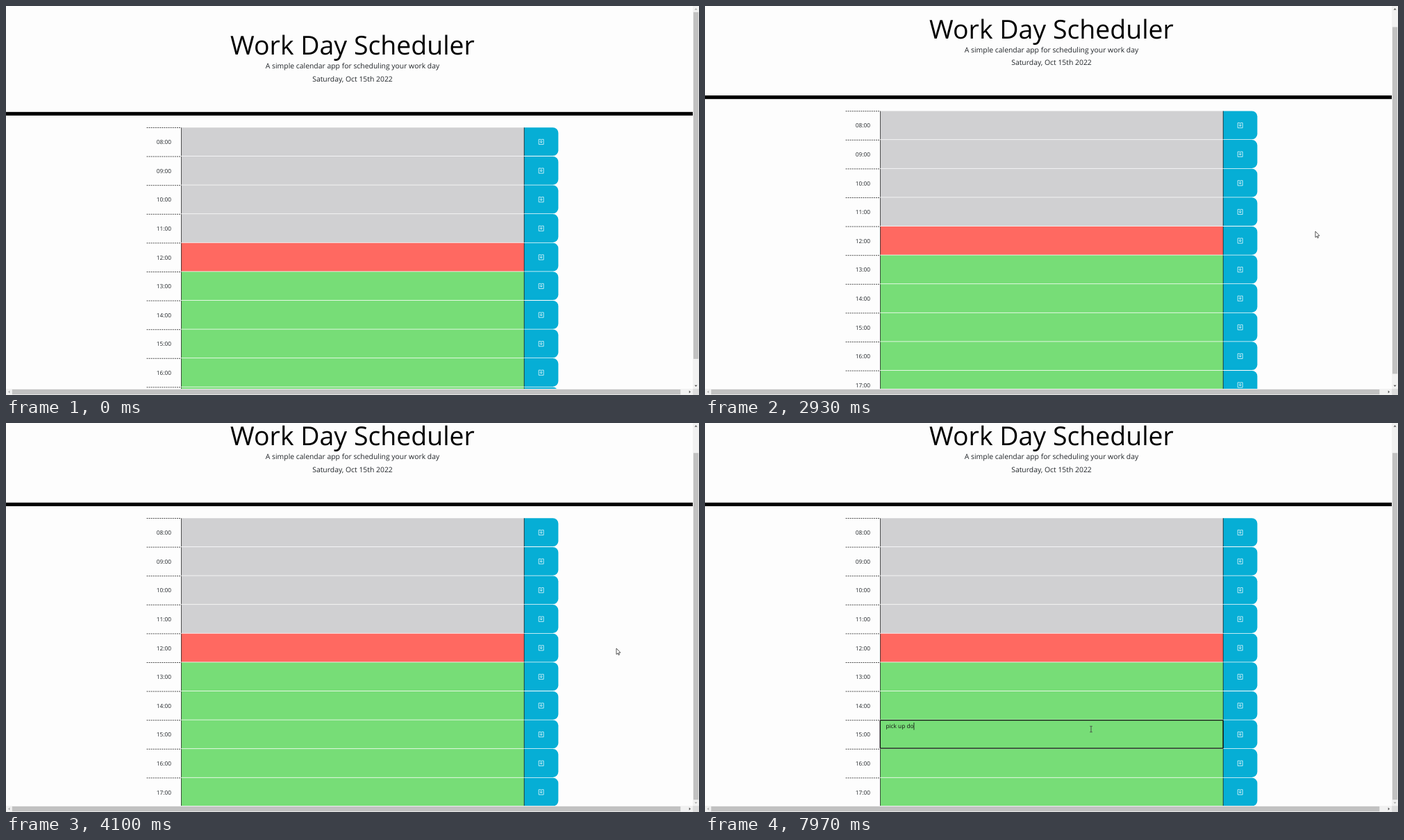
Animation, 998 px wide and 561 px high, one loop 8000 ms. Source, as an HTML page with a canvas:

```html
<!DOCTYPE html>
<html lang="en">
<head>
<meta charset="utf-8">
<title>Work Day Scheduler</title>
<style>
html, body { margin: 0; width: 100%; height: 100%; overflow: hidden; background: #fdfdfd; }
canvas { display: block; width: 998px; height: 561px; }
</style>
</head>
<body>
<canvas id="stage"></canvas>
<script>
const W = 998, H = 561, LOOP = 8000;
const canvas = document.getElementById('stage');
const ctx = canvas.getContext('2d');
const dpr = window.devicePixelRatio || 1;
canvas.width = W * dpr;
canvas.height = H * dpr;

const PAPER = '#fdfdfd', INK = '#212529';
const BAR = 8.84;                        // scrollbar thickness
const VIEW_W = W - BAR, VIEW_H = H - BAR;
const MAX_SCROLL = 38, DOC_H = VIEW_H + MAX_SCROLL;
const ROW_TOP = 175, ROW_H = 41.6, NOW_ROW = 4, FOCUS_ROW = 7;
const LEFT = 202.6, AREA = 252, SAVE = 746, RIGHT = 795.4;

const CLICK = 4880, TYPE_START = 6400, TYPE_STEP = 160, BLINK = 530;
const NOTE = 'pick up do';

// Each key is [time, value...]; values ease between neighbours.
const scrollKeys = [[2000, 0], [2250, 38], [2848, 38], [3048, 0], [3500, 0], [3700, 38]];
const mouseKeys = [[560, 968, 430], [830, 879, 325], [4300, 879, 325], [4850, 556, 441.5]];

function sample(keys, t) {
  if (t <= keys[0][0]) return keys[0].slice(1);
  for (let i = 1; i < keys.length; i++) {
    const a = keys[i - 1], b = keys[i];
    if (t < b[0]) {
      const u = (t - a[0]) / (b[0] - a[0]);
      const e = u * u * (3 - 2 * u);
      return a.slice(1).map((v, k) => v + (b[k + 1] - v) * e);
    }
  }
  return keys[keys.length - 1].slice(1);
}

function rect(color, x, y, w, h) {
  ctx.fillStyle = color;
  ctx.fillRect(x, y, w, h);
}

function text(str, x, y, size, color = INK, align = 'center') {
  ctx.font = `400 ${size}px "Open Sans", "Noto Sans", sans-serif`;
  ctx.textAlign = align;
  ctx.fillStyle = color;
  ctx.fillText(str, x, y);
}

function line(points, color, width) {
  ctx.beginPath();
  points.forEach(([x, y], i) => i ? ctx.lineTo(x, y) : ctx.moveTo(x, y));
  ctx.strokeStyle = color;
  ctx.lineWidth = width;
  ctx.stroke();
}

function saveIcon(cx, cy) {
  ctx.save();
  ctx.translate(cx - 4.2, cy - 4.2);
  ctx.scale(0.525, 0.525);
  ctx.lineJoin = ctx.lineCap = 'round';
  line([[5.5, 1.2], [1.4, 1.2], [1.4, 15], [14.6, 15], [14.6, 1.2], [10.5, 1.2]], '#fff', 1.4);
  line([[8, 1], [8, 10]], '#fff', 1.4);
  line([[5, 7.5], [8, 10.5], [11, 7.5]], '#fff', 1.4);
  ctx.restore();
}

function drawRow(i) {
  const y = ROW_TOP + ROW_H * i;
  const color = i < NOW_ROW ? '#d0d0d2' : i === NOW_ROW ? '#ff6961' : '#77dd77';
  const top = y + 0.3, height = ROW_H - 0.8;

  ctx.setLineDash([1.9, 1.2]);
  line([[LEFT, y + 0.5], [AREA, y + 0.5]], '#333', 0.9);
  ctx.setLineDash([]);
  text(`${String(i + 8).padStart(2, '0')}:00`, 227.4, y + 24.2, 8.32);

  rect(color, AREA, top, SAVE - AREA, height);
  rect('#222', AREA, top, 0.75, height);

  ctx.fillStyle = '#06aed5';
  ctx.beginPath();
  ctx.roundRect(SAVE, top, RIGHT - SAVE, height, [0, 7.8, 7.8, 0]);
  ctx.fill();
  rect('#222', SAVE - 0.2, top, 0.8, height);
  saveIcon(770.7, y + 20.9);
}

function drawFocus(t) {
  if (t < CLICK) return;
  const y = ROW_TOP + ROW_H * FOCUS_ROW;
  ctx.strokeStyle = '#101010';
  ctx.lineWidth = 1.3;
  ctx.beginPath();
  ctx.roundRect(AREA + 0.2, y + 0.4, SAVE - AREA, ROW_H - 1, 1);
  ctx.stroke();

  const count = Math.max(0, Math.min(NOTE.length, Math.floor((t - TYPE_START) / TYPE_STEP) + 1));
  const typed = NOTE.slice(0, count);
  text(typed, 260.4, y + 12, 8.32, '#111', 'left');
  const caretOn = count > 0 || Math.floor((t - CLICK) / BLINK) % 2 === 0;
  if (caretOn) rect('#111', 260.4 + ctx.measureText(typed).width, y + 3.8, 0.8, 10.6);
}

function drawPage(t, scroll) {
  ctx.save();
  ctx.beginPath();
  ctx.rect(0, 0, VIEW_W, VIEW_H);
  ctx.clip();
  ctx.translate(0, -scroll);
  text('Work Day Scheduler', 499, 70.4, 37.44, '#000');
  text('A simple calendar app for scheduling your work day', 499, 90.4, 10.4);
  text('Saturday, Oct 15th 2022', 499, 109.2, 10.4);
  rect('#000', 0, 152.8, VIEW_W, 5.2);
  for (let i = 0; i < 10; i++) drawRow(i);
  drawFocus(t);
  ctx.restore();
}

function arrow(x, y, angle, active) {
  ctx.save();
  ctx.translate(x, y);
  ctx.rotate(angle);
  ctx.fillStyle = active ? '#505050' : '#a8a8a8';
  ctx.beginPath();
  ctx.moveTo(0, -1.2);
  ctx.lineTo(2, 1);
  ctx.lineTo(-2, 1);
  ctx.fill();
  ctx.restore();
}

function drawScrollbars(scroll) {
  const track = VIEW_H - 2 * BAR, mid = BAR / 2;
  const thumb = track * VIEW_H / DOC_H;
  const offset = (track - thumb) * scroll / MAX_SCROLL;
  rect('#f1f1f1', VIEW_W, 0, BAR, VIEW_H);
  rect('#f1f1f1', 0, VIEW_H, VIEW_W, BAR);
  rect('#dcdcdc', VIEW_W, VIEW_H, BAR, BAR);
  rect('#c1c1c1', VIEW_W + 0.8, BAR + offset, BAR - 1.6, thumb);
  rect('#c1c1c1', BAR, VIEW_H + 0.8, 962.5, BAR - 1.6);
  arrow(VIEW_W + mid, mid, 0, scroll > 0.5);
  arrow(VIEW_W + mid, VIEW_H - mid, Math.PI, scroll < MAX_SCROLL - 0.5);
  arrow(mid, VIEW_H + mid, -Math.PI / 2, false);
  arrow(VIEW_W - mid, VIEW_H + mid, Math.PI / 2, true);
}

function drawMouse(t) {
  if (t < mouseKeys[0][0]) return;
  const [x, y] = sample(mouseKeys, t);
  ctx.save();
  ctx.translate(x, y);
  if (x > AREA && x < SAVE) {
    line([[-1.8, -4.2], [1.8, -4.2]], '#444', 0.8);
    line([[0, -4.2], [0, 4.2]], '#444', 0.9);
    line([[-1.8, 4.2], [1.8, 4.2]], '#444', 0.8);
  } else {
    ctx.beginPath();
    const shape = [[0, 0], [0, 8.7], [2, 6.9], [3.2, 9.7], [4.5, 9.1], [3.3, 6.4], [5.9, 6.2]];
    shape.forEach(p => ctx.lineTo(p[0], p[1]));
    ctx.closePath();
    ctx.fillStyle = '#fff';
    ctx.fill();
    ctx.strokeStyle = '#222';
    ctx.lineWidth = 0.75;
    ctx.stroke();
  }
  ctx.restore();
}

function draw(t) {
  ctx.setTransform(dpr, 0, 0, dpr, 0, 0);
  ctx.textRendering = 'geometricPrecision';
  rect(PAPER, 0, 0, W, H);
  const [scroll] = sample(scrollKeys, t);
  drawPage(t, scroll);
  drawScrollbars(scroll);
  drawMouse(t);
}

const start = performance.now();
function tick() {
  draw((performance.now() - start) % LOOP);
  requestAnimationFrame(tick);
}
tick();
</script>
</body>
</html>
```
